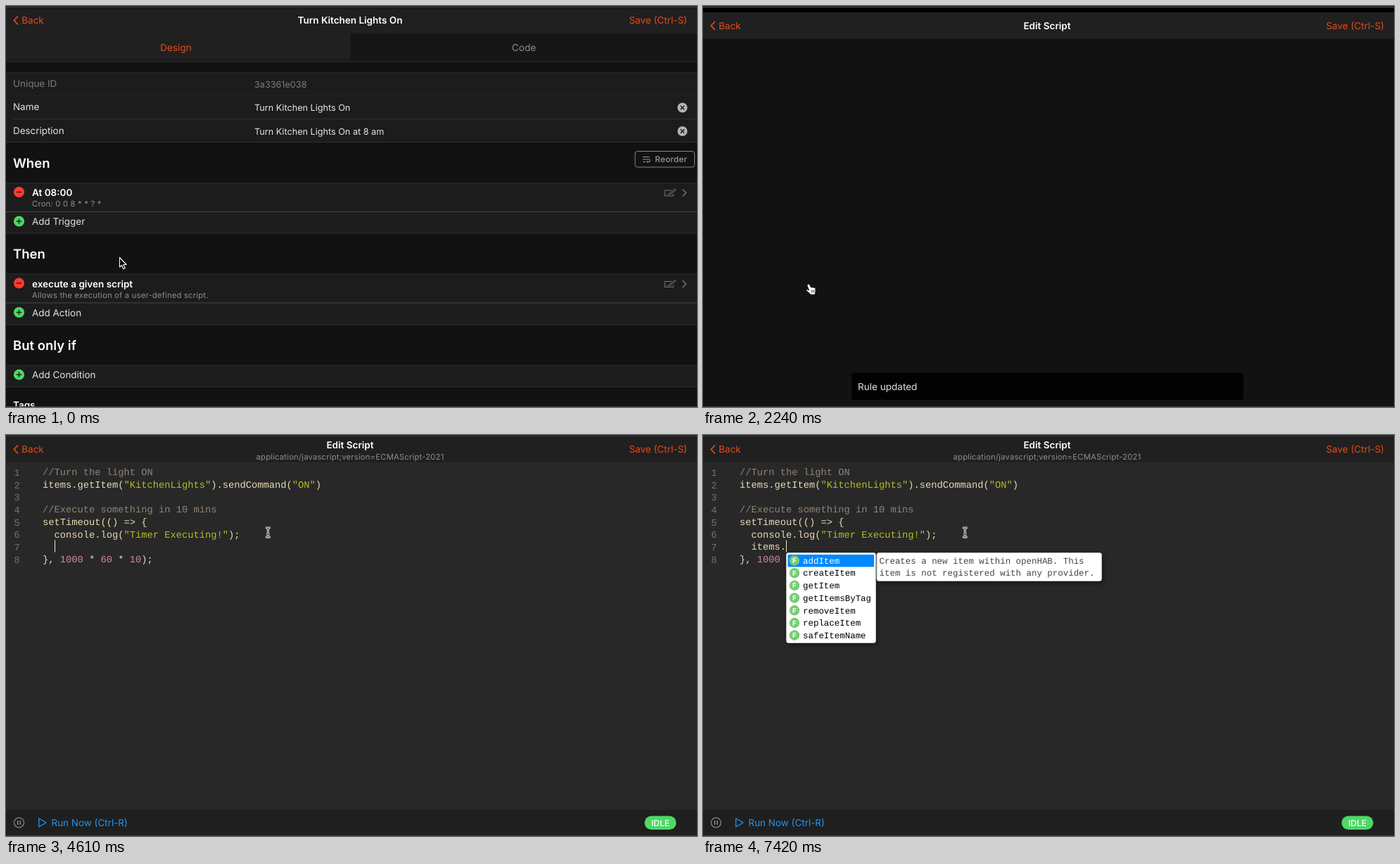
An HTML page for the animation above (8 s loop, 982 by 570 pixels).

```html
<!DOCTYPE html>
<html lang="en">
<head>
<meta charset="utf-8">
<title>Rule editor</title>
<style>
html, body { margin: 0; width: 100%; height: 100%; overflow: hidden; background: #000; }
svg { display: block; }
text { white-space: pre; font-family: Inter, Roboto, sans-serif; text-rendering: geometricPrecision; }
text.mono { font-family: "Liberation Mono", "Courier New", monospace; }
</style>
</head>
<body>
<svg id="stage" width="982" height="570" viewBox="0 0 982 570"></svg>
<script>
const LOOP = 8000, ORANGE = '#e64a19', GREEN = '#4cd964', BLUE = '#2196f3';
// Moments at which the screen refreshes
const STEPS = [0, 150, 300, 440, 590, 1940, 2090, 2240, 2390, 2830, 2980, 3130, 3270, 3420, 3570,
  3870, 4010, 4160, 4610, 5050, 5350, 5490, 5790, 5940, 6080, 6380, 6530, 6980, 7420];
const KEYS = [5350, 5490, 5790, 5940, 6080, 6380];
const CARET_OFF = [[4010, 4610], [5050, 5350], [6980, 7420]];
const CODE_X = 52, CODE_SIZE = 13.75, CHAR = CODE_SIZE * 0.6, LINE = 17.67;

const smooth = p => { p = Math.min(1, Math.max(0, p)); return p * p * (3 - 2 * p); };
const mix = (a, b, p) => a + (b - a) * p;

// y is the middle of the capitals
const text = (x, y, s, fill = '#e4e4e4', size = 13.45, extra = '') =>
  `<text x="${x}" y="${y + size * 0.36}" font-size="${size}" fill="${fill}" ${extra}>${s}</text>`;
const bold = (x, y, s, size = 13.5, extra = '') => text(x, y, s, '#fff', size, 'font-weight="600" ' + extra);
const mid = 'text-anchor="middle"', end = 'text-anchor="end"';
const small = (x, y, s, extra = '') => text(x, y, s, '#8e8e8e', 11.25, 'letter-spacing=".2" ' + extra);
const mono = (x, y, s, fill, size = CODE_SIZE) =>
  `<text class="mono" x="${x}" y="${y + size * 0.3}" font-size="${size}" fill="${fill}">${s}</text>`;
const rect = (x, y, w, h, fill, extra = '') =>
  `<rect x="${x}" y="${y}" width="${w}" height="${h}" fill="${fill}" ${extra}/>`;
const band = (y, h, fill) => rect(-6.5, y, 990.5, h, fill);
const path = (d, stroke, w = 1.2, fill = 'none', extra = '') =>
  `<path d="${d}" stroke="${stroke}" stroke-width="${w}" fill="${fill}" ${extra}/>`;
const group = (transform, body, opacity = 1) => `<g transform="${transform}" opacity="${opacity}">${body}</g>`;

const navLinks = () =>
  path('M17 14.5l-5.5 6 5.5 6', ORANGE, 1.8) + text(22.3, 20.5, 'Back', ORANGE) +
  text(968, 20.5, 'Save (Ctrl-S)', ORANGE, 13.5, end);

const badge = (y, color, plus) => `<circle cx="18.5" cy="${y}" r="7.6" fill="${color}"/>` +
  path(`M14.7 ${y}h7.6` + (plus ? `M18.5 ${y - 3.8}v7.6` : ''), '#1c1c1d', 1.4);

const field = (y, label, value, dim) =>
  text(10, y - 0.5, label, dim ? '#7c7c7c' : '#e4e4e4') + text(353, y + 0.5, value, dim ? '#7c7c7c' : '#e4e4e4', 12.65) +
  (dim ? '' : `<circle cx="961.3" cy="${y + 0.5}" r="7" fill="#b4b4b4"/>` +
    path(`M958.6 ${y - 2.2}l5.4 5.4m0-5.4l-5.4 5.4`, '#1c1c1d', 1.5));

const block = (y, h) => band(y, h, '#1c1c1d') + band(y - 0.5, 1, '#2f2f30') + band(y + h - 0.5, 1, '#2f2f30');

const entry = (y, title, note, hover) =>
  (hover ? band(y, 41, '#232325') : '') + band(y + 40.5, 1, '#474748') +
  badge(y + 13, '#ff3b30', false) + bold(37, y + 14, title) + small(37, y + 29.5, note) +
  path(`M946 ${y + 10.5}H936v8h12.5v-3M942 ${y + 16.5}l2.5-.6 7.5-6.2-1.2-1.3-7.5 6.2z`, '#777', 1) +
  path(`M938 ${y + 16.2}h3`, '#777', 1, 'none', 'stroke-dasharray="1 1"') +
  path(`M961.5 ${y + 9}l5 5-5 5`, '#777', 1.4);

const adder = (y, label) => badge(y, GREEN, true) + text(37, y + 0.5, label);

function rulePage(hover) {
  return band(2, 568, '#121212') + band(3, 36, '#202020') + navLinks() +
    bold(489, 20.5, 'Turn Kitchen Lights On', 13.5, mid) +
    band(39, 40, '#161616') + rect(-6.5, 39, 495.5, 37, '#202020') + rect(-6.5, 76, 495.5, 3, '#1b1b1b') +
    band(78.5, 1, '#303030') +
    text(241.5, 59, 'Design', ORANGE, 13.6, mid) + text(736, 59, 'Code', '#8e8e8e', 13.6, mid) +
    block(95, 98.5) + rect(10, 127, 974, 1, '#222223') + rect(10, 160, 974, 1, '#303031') +
    field(111, 'Unique ID', '3a3361e038', true) +
    field(144, 'Name', 'Turn Kitchen Lights On') +
    field(177.5, 'Description', 'Turn Kitchen Lights On at 8 am') +
    bold(10, 223, 'When', 18.5) +
    rect(894, 206.5, 84.5, 22.5, 'none', 'rx="3.5" stroke="#858585"') +
    path('M905 214.5h9.5M905 218h8.5q2 0 2 1.8t-2 1.7h-2.5m1.6-1.6l-1.6 1.6 1.6 1.6M905 221.5h4', '#999', 1) +
    text(968, 218, 'Reorder', '#999', 11.8, end + ' font-weight="500" letter-spacing=".15"') +
    block(251.5, 71.5) + entry(251.5, 'At 08:00', 'Cron: 0 0 8 * * ? *') + adder(306, 'Add Trigger') +
    bold(10, 352.5, 'Then', 18.5) +
    block(381, 72) + entry(381, 'execute a given script', 'Allows the execution of a user-defined script.', hover) +
    adder(435.5, 'Add Action') +
    bold(10, 482, 'But only if', 18.5) +
    block(511, 30.5) + adder(524, 'Add Condition') +
    bold(10, 567, 'Tags');
}

const highlight = s => s.replace(/(\/\/.*)|("[^"]*")|(\d+)/g, (m, comment, string) =>
  `<tspan fill="${comment ? '#928374' : string ? '#b8bb26' : '#d3869b'}">${m}</tspan>`);

function popup() {
  const names = ['addItem', 'createItem', 'getItem', 'getItemsByTag', 'removeItem', 'replaceItem', 'safeItemName'];
  const size = 12.45, shadow = 'rx="3" stroke="#c0c0c0" style="filter:drop-shadow(2px 3px 3px #0006)"';
  return rect(118.5, 167.5, 127, 128, '#fff', shadow) + rect(247, 167.5, 319.5, 40, '#fff', shadow) +
    rect(120.5, 170, 122.5, 17.5, '#08f', 'rx="1"') +
    names.map((name, i) => {
      const y = 179 + i * 17.7;
      return `<circle cx="130" cy="${y - 0.5}" r="7.2" fill="#7c7"/>` +
        `<text class="mono" x="130" y="${y + 3}" font-size="10.5" font-weight="bold" fill="#fff" ${mid}>F</text>` +
        mono(142, y, name, i ? '#000' : '#fff', size);
    }).join('') +
    mono(250.5, 179, 'Creates a new item within openHAB. This', '#444', size) +
    mono(250.5, 196.7, 'item is not registered with any provider.', '#444', size);
}

function editor(t) {
  const typed = 'items.'.slice(0, KEYS.filter(k => k <= t).length);
  const lines = ['//Turn the light ON', 'items.getItem("KitchenLights").sendCommand("ON")', '',
    '//Execute something in 10 mins', 'setTimeout(() => {', '  console.log("Timer Executing!");',
    ...(t >= 4610 ? ['  ' + typed] : []), '}, 1000 * 60 * 10);'];
  const row = t >= 4610 ? 6 : 5;
  const caret = t >= 3570 && !CARET_OFF.some(([a, b]) => t >= a && t < b);
  return band(2, 568, '#282828') + band(3, 36, '#202020') + navLinks() +
    bold(489, 14, 'Edit Script', 13.5, mid) +
    small(489, 30.5, 'application/javascript;version=ECMAScript-2021', mid) +
    lines.map((s, i) => {
      const y = 53.3 + i * LINE;
      return mono(11.5, y + 0.5, i + 1, '#7c6f64') + mono(CODE_X, y, highlight(s), '#ebdbb2');
    }).join('') +
    (caret ? rect(Math.round(CODE_X + lines[row].length * CHAR), 149.5 + (row - 6) * LINE, 1, 17, '#f0e6cc') : '') +
    (t >= 6530 ? popup() : '') +
    band(533, 37, '#1f1f1f') +
    '<circle cx="18.5" cy="551" r="7" fill="none" stroke="#999" stroke-width="1.1"/>' +
    path('M16.7 548v6m3.6-6v6', '#999', 1.3) +
    path('M46.8 545v12l10.2-6z', BLUE, 1.3, 'none', 'stroke-linejoin="round"') + text(64.5, 551.5, 'Run Now (Ctrl-R)', BLUE) +
    rect(907.5, 541.5, 45, 19.5, GREEN, 'rx="9.75"') + text(930, 551.5, 'IDLE', '#fff', 12, mid + ' font-weight="500"');
}

// Rule page shrinks back while the empty sheet slides up
function opening(t) {
  const [lift, scale, top, light] = t < 2090 ? [419.5, 0.938, 18.25, 0.87] : t < 2240 ? [85, 0.93, 19.5, 0.6] : [7.5, 0.93, 20, 0.5];
  const sheet = band(-6, 8, '#000') + band(1.5, 569, '#121212') + band(1.5, 37.5, '#202020') + navLinks() +
    bold(489, 20.5, 'Edit Script', 13.5, mid);
  return group(`translate(489 ${top}) scale(${scale}) translate(-489 0)`, rulePage(true), light) +
    group(`translate(0 ${lift})`, sheet);
}

function toast(t) {
  if (t < 1940 || t >= 4160) return '';
  const [scale, opacity] = t < 2090 ? [0.97, 0.85] : t < 3870 ? [1, 1] : t < 4010 ? [0.97, 0.7] : [0.92, 0.25];
  return group(`translate(489.5 540.5) scale(${scale}) translate(-489.5 -540.5)`,
    rect(211, 521, 557, 39, '#000', 'rx="4" fill-opacity=".9"') + text(220, 541, 'Rule updated', '#e4e4e4', 13.55), opacity);
}

function pointer(t) {
  const down = smooth(t / 590), up = smooth((t - 2680) / 740);
  const x = mix(mix(161.5, 150.5, down), 372.3, up), y = mix(mix(357.5, 393.5, down), 138.5, up);
  let shape;
  if (t < 2390 && y > 381) {
    shape = path('M-2 2.5q1.6-2 3 0l2.2 4.3q.8-1.3 2 0 1.2-1 2.1.2 1.7-.6 2 1.2l.3 4.3-1.2 4.2H2.7L-3.6 11q-.8-2.2 1.6-1.5L.2 10.5-2.5 4z', '#000', 0.8, '#fff') +
      path('M3.6 10v4m2.1-4v4m2-4v4', '#000', 0.7);
  } else if (y < 175) {
    const beam = 'M-3.5-6.7h1.7Q0-6.7 0-5 0-6.7 1.8-6.7H3.5M-3.5 6.7h1.7Q0 6.7 0 5 0 6.7 1.8 6.7H3.5M0-5v10M-2 2.5h4';
    shape = path(beam, '#fff', 2.8) + path(beam, '#111', 0.9);
  } else {
    shape = path('M0 0v13.6l3-2.8 2.3 5.4 2.4-1-2.3-5.2h4.2z', '#fff', 1.1, '#000', 'stroke-linejoin="round"');
  }
  return group(`translate(${x} ${y})`, shape);
}

function scene(t) {
  const screen = t < 1940 ? rulePage(false) : t < 2390 ? opening(t) : editor(t);
  return rect(0, 0, 982, 570, '#000') + screen + toast(t) +
    rect(0, 0, 982, 3, '#161616') + rect(0, 1, 982, 1, '#464646') + rect(0, 569, 982, 1, '#3a3a3a') +
    pointer(t);
}

const stage = document.getElementById('stage'), start = performance.now();
let shown = -1;
function frame() {
  const now = (performance.now() - start) % LOOP;
  const t = STEPS.filter(s => s <= now).pop();
  if (t !== shown) stage.innerHTML = scene(shown = t);
  requestAnimationFrame(frame);
}
frame();
</script>
</body>
</html>
```
